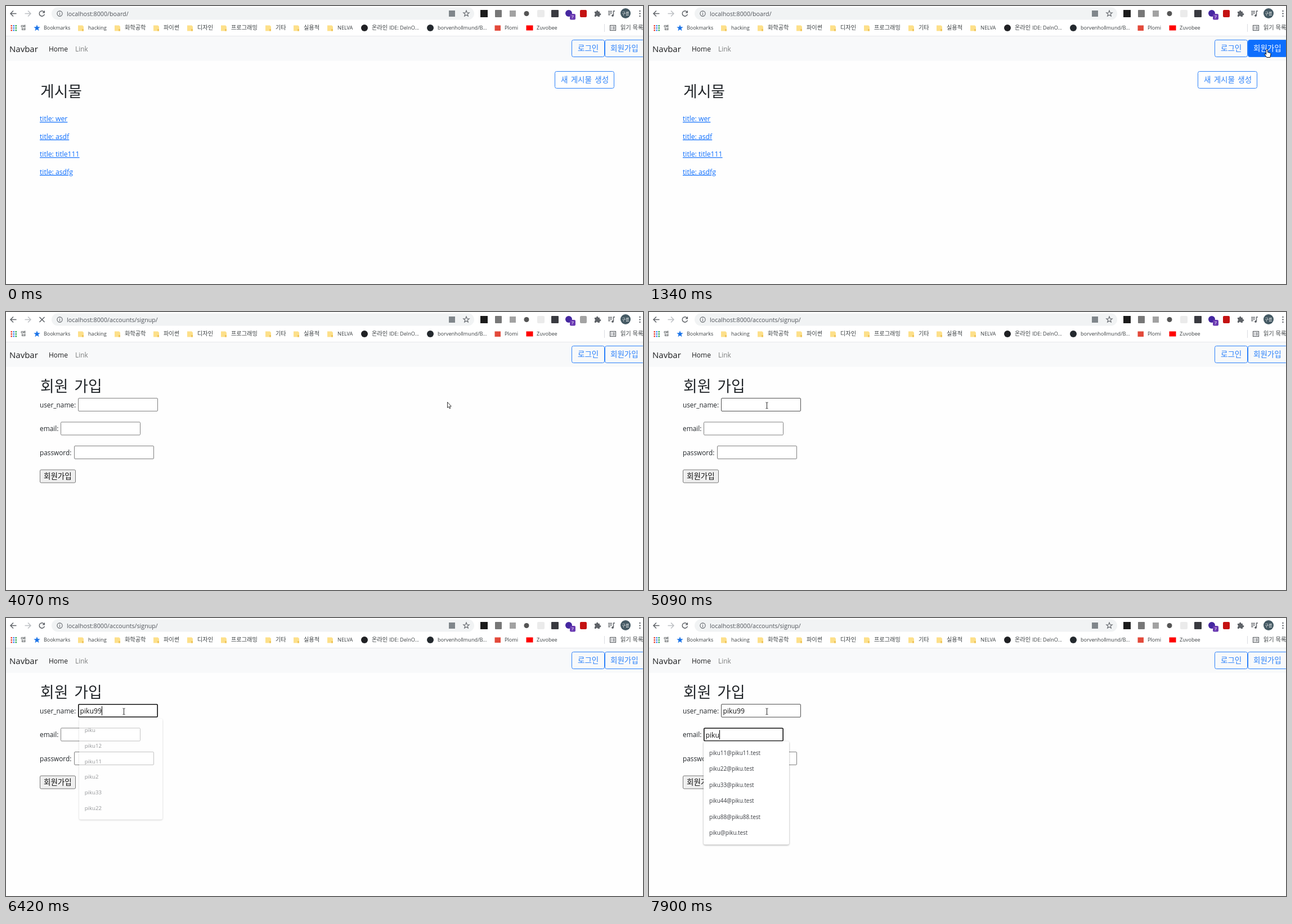
Recreate the animation shown at these times as an HTML page. Size 1132 by 495 pixels, loop 8000 ms.

```html
<!DOCTYPE html>
<html lang="ko">
<head>
<meta charset="utf-8">
<title>Board sign-up</title>
<style>
html, body { margin: 0; width: 100%; height: 100%; overflow: hidden; background: #fff; }
svg { display: block; width: 100%; height: 100%; }
text { font-family: "Open Sans", "Noto Sans", sans-serif; white-space: pre; }
.ko { font-family: "Noto Sans CJK KR", "Noto Sans CJK", sans-serif; }
.light { font-weight: 300; }
.link { text-decoration: underline; }
.list { filter: drop-shadow(0 1px 1.5px rgba(0, 0, 0, .35)); }
</style>
</head>
<body>
<svg id="stage" viewBox="0 0 1132 495" xmlns="http://www.w3.org/2000/svg"></svg>
<script>
const LOOP = 8000, BLUE = [13, 110, 253], SOFT = [42, 128, 250], INK = '#212529', GREY = '#5f6368';
const stage = document.getElementById('stage');
const $ = id => document.getElementById(id);

const text = (x, y, size, str, fill = INK, attrs = '') =>
  `<text x="${x}" y="${y}" font-size="${size}" fill="${fill}" ${attrs}>${str}</text>`;
const hangul = (x, y, size, str, fill = INK, attrs = '', cls = '') =>
  text(x, y, size, str, fill, `class="ko ${cls}" ${attrs}`);
const box = (x, y, w, h, fill, attrs = '') =>
  `<rect x="${x}" y="${y}" width="${w}" height="${h}" fill="${fill}" ${attrs}/>`;
const dot = (x, y, r, fill, attrs = '') =>
  `<circle cx="${x}" cy="${y}" r="${r}" fill="${fill}" ${attrs}/>`;
const line = (d, color = GREY, w = 1.5, attrs = '') =>
  `<path d="${d}" fill="none" stroke="${color}" stroke-width="${w}" ${attrs}/>`;
const shape = (d, fill, attrs = '') => `<path d="${d}" fill="${fill}" ${attrs}/>`;

function star(cx, cy, r) {
  return 'M' + Array.from({ length: 10 }, (_, i) => {
    const a = i * Math.PI / 5 - Math.PI / 2, q = i % 2 ? r * .42 : r;
    return (cx + q * Math.cos(a)).toFixed(1) + ' ' + (cy + q * Math.sin(a)).toFixed(1);
  }).join('L') + 'Z';
}

function toolbar() {
  return box(81, 2.5, 751, 22, '#f1f3f4', 'rx="11"') +
    line('M18.5 13.5H8.5M13 8.5L8 13.5L13 18.5') +
    line('M33.5 13.5H43.5M39 8.5L44 13.5L39 18.5', '#bdc0c4') +
    `<g id="reload">${line('M67.3 10.2A4.7 4.7 0 1 0 68.4 14.6')}${shape('M69 7.8V12.4H64.4Z', GREY)}</g>` +
    line('M59.5 9L68.5 18M68.5 9L59.5 18', GREY, 1.5, 'id="stop"') +
    dot(95.5, 13.5, 4.6, 'none', `stroke="${GREY}" stroke-width="1.1"`) +
    line('M95.5 12.8V16M95.5 10.7V11.8', GREY, 1.1) +
    text(108, 17.5, 10.7, '', '#50545a', 'id="url"') +
    box(787, 8, 11, 11, '#80868b') +
    line(star(818, 13.6, 5.6), GREY, 1.1) +
    box(843, 7, 13, 13, '#1b1b1b') + box(869, 7, 12, 13, '#777', 'rx="1"') +
    box(895, 8, 11, 11, '#a2a2a2') + dot(925, 13.5, 4.5, '#555') +
    box(944, 7, 13, 13, '#ebebeb', 'rx="2"') + box(969, 7, 13, 13, '#393a40', 'rx="1"') +
    dot(1000, 13, 6, '#4527a0') + box(1002, 14, 10, 10.5, '#6a3ab2', 'rx="2"') +
    text(1004.6, 22.3, 8, '7', '#fff') +
    box(1020, 7, 12, 13, '', 'rx="2" id="ext"') +
    shape('M1046 10H1049V9.4A1.7 1.7 0 0 1 1052.4 9.4V10H1055V13H1055.7A1.7 1.7 0 0 1 1055.7 16.4H1055V19H1051.7A1.6 1.6 0 0 0 1048.5 19H1046V15.6A1.5 1.5 0 0 0 1046 12.7Z', GREY) +
    line('M1070 9.5H1077M1070 12.5H1077M1070 15.5H1074M1079.5 17V9H1082', GREY, 1.4) +
    dot(1078, 17, 1.9, GREY) +
    dot(1101, 13, 9, '#455a64') + hangul(1101, 15.7, 7, '구름', '#fff', 'text-anchor="middle"') +
    [9, 13.5, 18].map(y => dot(1126.5, y, 1.2, GREY)).join('');
}

function bookmarks() {
  const ink = '#3c4043', base = 42.3;
  const colors = ['#ea4335', '#4285f4', '#34a853', '#fbbc04'];
  const latin = (x, str, size = 9.15) => text(x, base, size, str, ink);
  const korean = (x, str) => hangul(x, base, 10.2, str, ink);
  const apps = Array.from({ length: 9 }, (_, i) => {
    const row = i / 3 | 0;
    return box(8.5 + i % 3 * 4, 34 + row * 4, 2.5, 2.5, colors[(i + row) % 4]);
  }).join('');
  const folders = [[128, 'hacking'], [193, '화학공학'], [262, '파이썬'], [322, '디자인'],
    [382, '프로그래밍'], [461, '기타'], [511, '실용적'], [571, 'NELVA']];
  return apps + korean(26, '앱') +
    shape(star(55, 39.3, 6), '#1a73e8') + latin(67, 'Bookmarks', 8.95) +
    folders.map(([x, name]) =>
      shape(`M${x} 34.5H${x + 8}L${x + 10} 36.5V44.5H${x}Z`, '#fde08a') +
      shape(`M${x + 7} 44.5V41H${x + 10}V44.5Z`, '#efc55c') +
      (/[A-z]/.test(name) ? latin : korean)(x + 18, name)).join('') +
    dot(637, 39, 6, '#202124') + korean(650, '온라인') + latin(681, 'IDE: DelnO...') +
    dot(754, 39, 6, '#24292e') + latin(767, 'borvenhollmund/B...') +
    box(868.5, 34.5, 10.5, 9.5, '#e34a3b') + latin(886, 'Plomi') +
    box(924.5, 34.5, 12, 9, '#f00') + latin(943, 'Zuvobee') +
    line('M1063.5 32V46', '#dadce0', 1) +
    box(1073.5, 34.5, 10, 9, 'none', `stroke="${GREY}" stroke-width="1.2"`) +
    line('M1075 37H1076.5M1075 39H1076.5M1075 41H1076.5M1078 37H1082M1078 39H1082M1078 41H1082', GREY, 1) +
    korean(1092, '읽기 목록');
}

const button = (id, x, y, w, tx, label, attrs = '') => `<g id="${id}">` +
  box(x + .5, y + .5, w, 30, 'none', `rx="3" stroke="rgb(${SOFT})"`) +
  hangul(tx, y + 20.2, 13.5, label, '', attrs, 'light') + '</g>';

// name, left, top
const fields = [['user', 128, 153], ['email', 97, 195.5], ['pass', 121, 238]];
const field = ([id, x, y]) => `<rect id="${id}" rx="1.5" fill="#fff"/>` +
  text(x + 3.5, y + 17, 12.2, '', '#111', `id="${id}Text"`) +
  line('', '#000', 1, `id="${id}Caret"`);

const list = (id, x, y, items) => `<g id="${id}"><g class="list">${box(x, y, 152, 184, '#fff', 'rx="3"')}</g>` +
  items.map((s, i) => text(x + 10, y + 24.5 + i * 28.4, 9.9, s, '#3a3d42')).join('') + '</g>';

const board = '<g id="board">' +
  hangul(61, 161.5, 26.8, '게시물', INK, '', 'light') +
  button('create', 975, 116, 105, 986, '새 게시물 생성', 'word-spacing="1.5"') +
  ['wer', 'asdf', 'title111', 'asdfg'].map((s, i) =>
    text(60, 205.3 + i * 31.5, 12.2, 'title: ' + s, '#0d6efd', 'class="link"')).join('') + '</g>';

const names = ['', '12', '11', '2', '33', '22'].map(n => 'piku' + n);
const mails = ['11@piku11', '22@piku', '33@piku', '44@piku', '88@piku88', '@piku'].map(s => `piku${s}.test`);

const signup = '<g id="signup">' +
  hangul(61, 142, 26.8, '회원 가입', INK, 'word-spacing="3.5"', 'light') +
  text(60, 170, 11.8, 'user_name:') + text(60, 212.3, 11.9, 'email:') + text(60, 255, 11.8, 'password:') +
  fields.map(field).join('') +
  box(60.5, 281, 63, 23, '#efefef', 'rx="2" stroke="#767676"') +
  hangul(67, 297.3, 13.5, '회원가입', '#111', '', 'light') +
  list('names', 128, 177, names) + list('mails', 97, 219.5, mails) + '</g>';

const cursors =
  dot(1098.5, 77.5, 9.3, '#ffe93b', 'id="click" fill-opacity=".6"') +
  '<g id="cursor">' +
  shape('M.5 .5V10.5L2.7 8.5L4.2 12L5.8 11.3L4.3 8H7.3Z', '#fff', 'id="arrow" stroke="#222" stroke-width=".9"') +
  shape('M-1.4 1.2Q0 -.8 1.4 1.2V5.3L6 6.6Q7.2 7.2 7 9L5.8 14.5H-.3L-4 9.3Q-4.3 7.5 -2.7 8L-1.4 9.2Z', '#fff', 'id="hand" stroke="#111"') +
  line('M-2 -5.5H-.7L0 -5L.7 -5.5H2M0 -5V5M-2 5.5H-.7L0 5L.7 5.5H2', '#222', 1, 'id="beam"') + '</g>';

stage.innerHTML = box(0, 97, 1132, 398, '#fefefe') + toolbar() + bookmarks() +
  box(0, 53, 1132, 44.5, '#f8f9fa') + line('M0 53.5H1132', '#e6e8ea', 1) +
  text(6, 82.3, 15, 'Navbar', '#1b1c1d') + text(76, 80.7, 12, 'Home', '#1b1c1d') + text(123, 80.7, 11.9, 'Link', '#7c7d7d') +
  button('login', 1005, 60, 58, 1016, '로그인') + button('join', 1064, 60, 70, 1074, '회원가입') +
  board + signup + cursors;

// The screen refreshes only in bursts: start, end, number of refreshes.
const bursts = [[0, 0, 1], [190, 390, 4], [660, 990, 6], [1060, 1340, 5], [3200, 3200, 1], [3340, 4070, 9],
  [4200, 4950, 11], [5020, 5090, 2], [5290, 5490, 3], [5820, 5890, 2], [6030, 6150, 2], [6350, 6420, 2],
  [6490, 6570, 2], [6880, 6880, 1], [7430, 7430, 1], [7630, 7900, 4]];

function lastRefresh(t) {
  const [a, b, n] = bursts.filter(s => s[0] <= t).pop();
  if (t >= b) return b;
  const step = (b - a) / (n - 1);
  return a + Math.floor((t - a) / step) * step;
}

// Pointer path: time, x, y.
const path = [[190, 992, 380], [390, 1058, 231], [600, 1058, 231], [860, 1055, 125], [990, 1083, 79],
  [1340, 1098, 77], [3340, 1098, 77], [4070, 784, 160], [4150, 784, 160], [4750, 232, 206],
  [4950, 209, 178], [5090, 209, 166]];

function pointer(t) {
  const i = path.findIndex(k => k[0] > t);
  if (i < 1) return (i ? path[path.length - 1] : path[0]).slice(1);
  const a = path[i - 1], b = path[i], p = (t - a[0]) / (b[0] - a[0]);
  return [a[1] + (b[1] - a[1]) * p, a[2] + (b[2] - a[2]) * p];
}

const clamp = v => Math.max(0, Math.min(1, v));
const show = (id, on) => $(id).setAttribute('visibility', on ? 'inherit' : 'hidden');
const within = ([px, py], x, y, w, h) => px >= x && px <= x + w && py >= y && py <= y + h;
const hoverFade = (t, on, off) => clamp(Math.min(1, (Math.min(t, off) - on) / 150) - Math.max(0, t - off) / 150);

function paintButton(id, p) {
  const [rect, label] = $(id).children;
  rect.setAttribute('fill', p ? `rgba(${BLUE},${p})` : 'none');
  label.setAttribute('fill', `rgb(${SOFT.map(c => Math.round(c + (255 - c) * p))})`);
}

function paintField([id, x, y], value, focus, hover, caret) {
  const rect = $(id), inset = focus ? .8 : .5;
  const set = { x: x + inset, y: y + inset, width: 142 - 2 * inset, height: 24 - 2 * inset,
    stroke: focus ? '#101010' : hover ? '#4f4f4f' : '#808080', 'stroke-width': 2 * inset };
  for (const k in set) rect.setAttribute(k, set[k]);
  const label = $(id + 'Text');
  label.textContent = value;
  show(id + 'Caret', focus && caret);
  const cx = Math.round(x + 3.5 + (value ? label.getComputedTextLength() : 0)) + .5;
  $(id + 'Caret').setAttribute('d', `M${cx} ${y + 4}V${y + 20.5}`);
}

function paintList(id, cx, cy, p) {
  show(id, p > 0);
  const s = .945 + .055 * p;
  $(id).setAttribute('opacity', p);
  $(id).setAttribute('transform', `translate(${cx} ${cy}) scale(${s}) translate(${-cx} ${-cy})`);
}

const typed = (str, times, t) => str.slice(0, times.filter(k => k <= t + 1).length);

function render(now) {
  const t = lastRefresh(now), onForm = t >= 3560, at = pointer(t);
  const loading = t >= 3420 && t < 4340;
  show('board', !onForm);
  show('signup', onForm);
  show('reload', !loading);
  show('stop', loading);
  $('url').textContent = 'localhost:8000/' + (onForm ? 'accounts/signup/' : 'board/');
  $('ext').setAttribute('fill', onForm && t < 4410 ? '#a3a3a3' : '#c41212');

  paintButton('login', 0);
  paintButton('create', hoverFade(t, 806, 885));
  paintButton('join', onForm ? 0 : hoverFade(t, 953, 3430));

  const inField = fields.map(f => onForm && within(at, f[1], f[2], 142, 24));
  const onMail = t >= 6880;
  const name = typed('piku99', [5820, 5890, 6030, 6150, 6350, 6420], t);
  const mail = typed('piku', [7630, 7720, 7810, 7900], t);
  paintField(fields[0], name, t >= 5290 && !onMail, inField[0], true);
  paintField(fields[1], mail, onMail, inField[1], t < 7430 || t >= 7630);
  paintField(fields[2], '', false, inField[2], false);
  paintList('names', 204, 268.5, clamp((t - 5290) / 190) * (1 - clamp((t - 6350) / 150)));
  paintList('mails', 173, 311.5, clamp((t - 7630) / 190));

  const beam = inField.some(Boolean);
  const hand = within(at, 1005, 60, 130, 31) || !onForm && within(at, 975, 116, 105, 31);
  show('click', t >= 3200 && t < 3340);
  show('cursor', t >= 190);
  show('beam', beam);
  show('hand', hand);
  show('arrow', !beam && !hand);
  $('cursor').setAttribute('transform', `translate(${at.map(v => Math.round(v) + (beam ? .5 : 0))})`);
}

const start = performance.now();
function tick() {
  render((performance.now() - start) % LOOP);
  requestAnimationFrame(tick);
}
tick();
</script>
</body>
</html>
```
